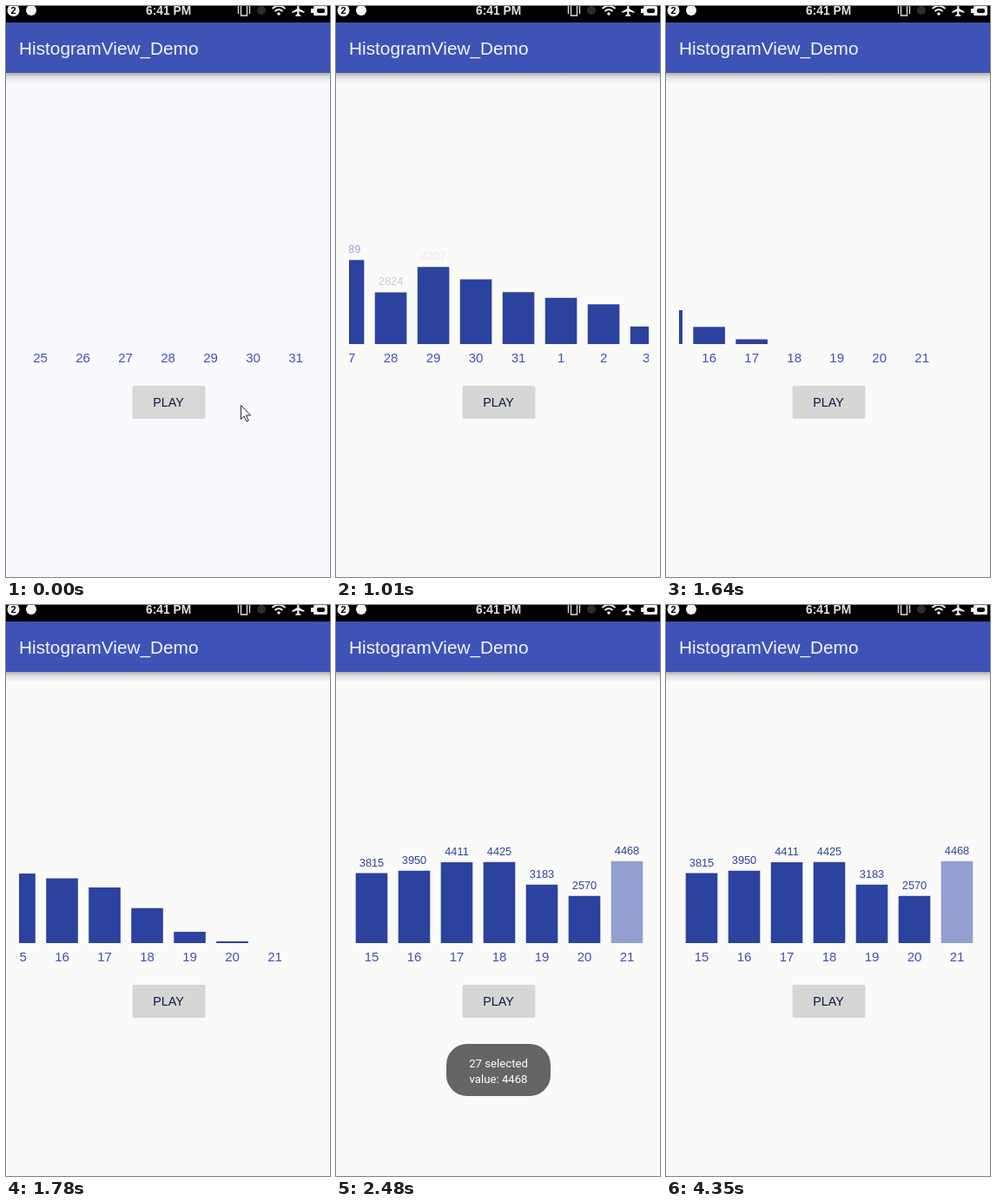
Recreate the animation shown at these times as an HTML page with a canvas. Size 373 by 657 pixels, loop 4.43 s.

```html
<!DOCTYPE html>
<html lang="en">
<head>
<meta charset="utf-8">
<title>Histogram</title>
<style>
html, body { margin: 0; width: 100%; height: 100%; overflow: hidden; background: #fafaf9; }
canvas { display: block; }
</style>
</head>
<body>
<canvas id="stage" width="373" height="657"></canvas>
<script>
const ctx = document.getElementById('stage').getContext('2d');
const LOOP = 4430;
const SANS = '"Liberation Sans", Arial, sans-serif';

const VALUES = [3120, 2475, 4589, 2824, 4207, 3530, 2915, 3061, 3688, 2885,
  3340, 4120, 2760, 3615, 4302, 2948, 3471, 2633, 4056, 3729, 3204,
  3815, 3950, 4411, 4425, 3183, 2570, 4468];
const SELECTED = VALUES.length - 1;
const BASE_Y = 389, BAR_W = 36.6, PITCH = 49, FIRST_X = 39.5, PX_PER_UNIT = 0.0211;
const GROW_START = 444, STAGGER = 50, GROW = 300, FADE = 350;
const SCROLL_START = 980, SCROLL_TIME = 1000, SCROLL_END = 1027.5;

const clamp = x => Math.min(1, Math.max(0, x));
const ramp = (t, start, duration) => clamp((t - start) / duration);
const easeInOut = x => 0.5 - Math.cos(Math.PI * x) / 2;

function overshoot(x, tension = 1.03) {
  const u = x - 1;
  return u * u * ((tension + 1) * u + tension) + 1;
}

function text(string, x, y, size, color, align = 'center', family = SANS, weight = 400) {
  ctx.font = `${weight} ${size}px ${family}`;
  ctx.textAlign = align;
  ctx.fillStyle = color;
  ctx.fillText(string, x, y);
}

function rect(x, y, w, h, color, radius = 0) {
  ctx.fillStyle = color;
  ctx.beginPath();
  ctx.roundRect(x, y, w, h, radius);
  ctx.fill();
}

function disc(x, y, r, color) {
  ctx.fillStyle = color;
  ctx.beginPath();
  ctx.arc(x, y, r, 0, 2 * Math.PI);
  ctx.fill();
}

function stroke(path, color, width) {
  ctx.strokeStyle = color;
  ctx.lineWidth = width;
  ctx.stroke(new Path2D(path));
}

function statusBar() {
  rect(0, 0, 373, 19, '#000');
  disc(8.5, 5, 7, '#f4f4f4');
  text('2', 8.5, 9, 11, '#000', 'center', SANS, 700);
  disc(29, 5, 6, '#f4f4f4');
  text('6:41 PM', 161, 10.3, 13.8, '#e4e4e4', 'left', SANS, 700);

  stroke('M270.5 -1V11H277.5V-1M267.5 0V9M280.5 0V9', '#ddd', 1.4);
  disc(294, 5, 5, '#2c2c2c');
  stroke('M306.5 3Q314 -3.5 321.5 3M309.5 6Q314 2 318.5 6', '#eee', 1.8);
  disc(314, 9, 1.8, '#eee');
  ctx.fillStyle = '#eee';
  ctx.fill(new Path2D('M335.2 -2h2.2v5l6 3.5v1.6l-6-1.8v3l2 1.5v1h-6.2v-1l2-1.5v-3l-6 1.8v-1.6l6-3.5z'));
  rect(354, 0, 16, 11, '#eee', 1.5);
  rect(351, 3, 4, 5, '#eee');
  rect(358, 3, 9, 5, '#000', 2);
}

function appBar() {
  const shadow = ctx.createLinearGradient(0, 77, 0, 89);
  shadow.addColorStop(0, 'rgba(0,0,0,.3)');
  shadow.addColorStop(0.4, 'rgba(0,0,0,.1)');
  shadow.addColorStop(1, 'rgba(0,0,0,0)');
  rect(0, 77, 373, 12, shadow);
  rect(0, 18, 373, 59, '#3e53b6');
  text('HistogramView_Demo', 15, 56, 20.8, '#f4f5fc', 'left');
}

function histogram(t) {
  const offset = SCROLL_END * overshoot(ramp(t, SCROLL_START, SCROLL_TIME));
  ctx.save();
  ctx.beginPath();
  ctx.rect(15, 90, 345, 340);
  ctx.clip();
  VALUES.forEach((value, i) => {
    const x = FIRST_X + i * PITCH - offset;
    if (x < -20 || x > 395) return;
    const start = GROW_START + i * STAGGER;
    const height = value * PX_PER_UNIT * easeInOut(ramp(t, start, GROW));
    rect(x - BAR_W / 2, BASE_Y - height, BAR_W, height, i === SELECTED ? '#939fce' : '#2c429f');
    text(i < 7 ? 25 + i : i - 6, x, 410.3, 15, '#3f51b0');
    ctx.globalAlpha = easeInOut(ramp(t, start + GROW, FADE));
    text(value, x, BASE_Y - height - 8, 12.8, '#30439a');
    ctx.globalAlpha = 1;
  });
  ctx.restore();
}

function toast(t) {
  ctx.globalAlpha = ramp(t, 1835, 330) * (1 - ramp(t, 3792, 328));
  rect(127, 505, 120, 60, '#656563', 24);
  text('27 selected', 187, 532, 13.2, '#fff', 'center', 'Roboto, sans-serif');
  text('value: 4468', 187, 549.5, 13.2, '#fff', 'center', 'Roboto, sans-serif');
  ctx.globalAlpha = 1;
}

function cursor() {
  const arrow = 'M270.5 459.5v16l3.7-3.5 2.6 6 2.4-1-2.6-6h5z';
  ctx.fillStyle = '#fff';
  ctx.fill(new Path2D(arrow));
  stroke(arrow, '#222836', 1);
}

function draw(t) {
  const idle = t < 460;
  rect(0, 0, 373, 657, idle ? '#faf9fd' : '#fafaf9');
  appBar();
  statusBar();
  histogram(t);
  rect(145.5, 437, 84, 38, idle ? '#d9d7d6' : '#d6d7d5', 2);
  text('PLAY', 187, 461.4, 14.3, '#0d1745');
  toast(t);
  if (t < 70) cursor();
}

const origin = performance.now();
function frame() {
  draw((performance.now() - origin) % LOOP);
  requestAnimationFrame(frame);
}
frame();
</script>
</body>
</html>
```
